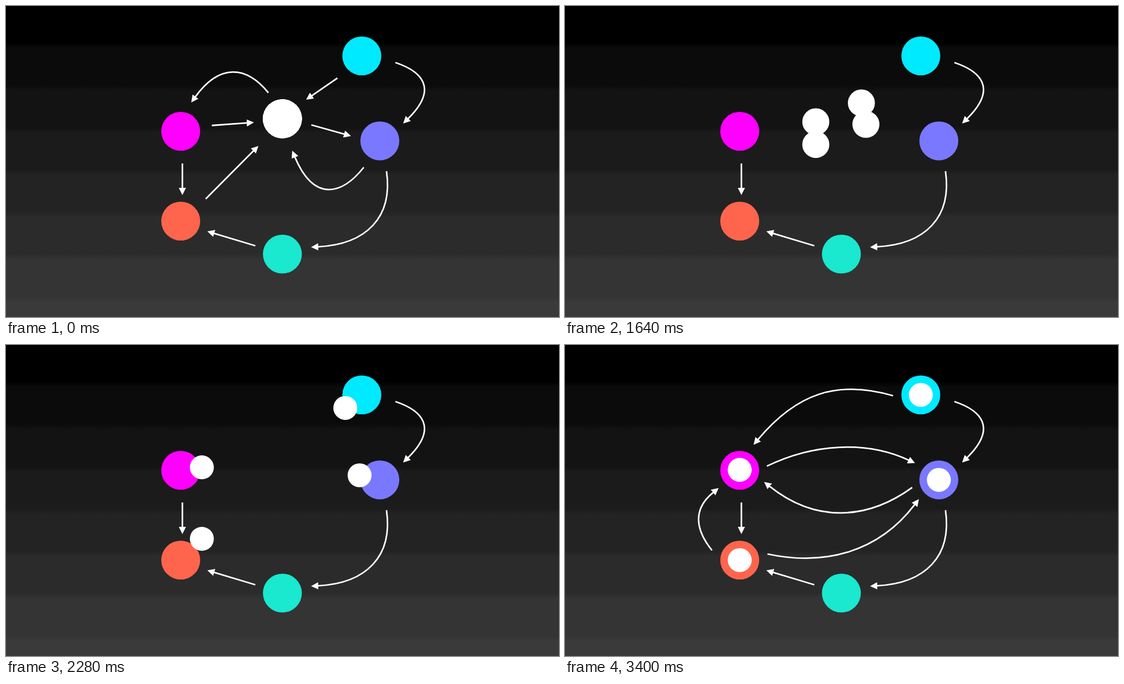
An HTML page that plays this animation: 997x561 px, repeating every 3880 ms.

```html
<!DOCTYPE html>
<html lang="en">
<head>
<meta charset="utf-8">
<title>Node graph</title>
<style>
  html, body { margin: 0; width: 100%; height: 100%; overflow: hidden; background: #000; }
  svg {
    display: block; width: 997px; height: 561px;
    background: linear-gradient(
      #000 66px, #0b0b0b 76px 143px, #131313 153px 219px, #1b1b1b 229px 295px,
      #232323 305px 371px, #2b2b2b 381px 447px, #343434 457px 524px, #3a3a3a 534px);
  }
  .arrows path { fill: none; stroke: #fff; stroke-width: 2.8; marker-end: url(#head); }
</style>
</head>
<body>
<svg viewBox="0 0 997 561">
  <defs>
    <marker id="head" markerUnits="userSpaceOnUse" markerWidth="13" markerHeight="13"
            refX="0.5" refY="6.5" orient="auto">
      <path d="M0 0L13 6.5L0 13Z" fill="#fff"/>
    </marker>
  </defs>
  <g id="fixed" class="arrows"></g>
  <g id="before" class="arrows"></g>
  <g id="after" class="arrows"></g>
  <g id="nodes"></g>
  <g id="parts"></g>
</svg>
<script>
const LOOP = 3880, STEP = 40;
const START = 980, MOVE = 1900, SHRINK = 960;
const HUB = { x: 498.3, y: 203.4, r: 35.2 }, PART_R = 21.6;

const $ = id => document.getElementById(id);

function add(parent, tag, attrs) {
  const el = document.createElementNS('http://www.w3.org/2000/svg', tag);
  for (const key in attrs) el.setAttribute(key, attrs[key]);
  return parent.appendChild(el);
}

// Points: tail, optional two curve controls, tip. The line stops at the base of the head.
function arrow(group, ...p) {
  const [cx, cy, tx, ty] = p.slice(-4);
  const k = 12.5 / Math.hypot(tx - cx, ty - cy);
  const end = [tx - (tx - cx) * k, ty - (ty - cy) * k];
  const mid = p.slice(2, -2);
  const d = `M${p[0]} ${p[1]}${mid.length ? 'C' : 'L'}${[...mid, ...end].join(' ')}`;
  add($(group), 'path', { d });
}

arrow('fixed', 702, 102, 750, 118, 780, 149, 716, 212);
arrow('fixed', 686, 298, 698, 381, 650, 430, 550, 435);
arrow('fixed', 318, 284, 318, 341);
arrow('fixed', 449.5, 432.5, 363, 406.5);

arrow('before', 473, 156.5, 432, 106, 384, 105, 334, 174);
arrow('before', 371, 215.5, 447, 210);
arrow('before', 360, 348, 455, 252.5);
arrow('before', 597.5, 130, 541, 169);
arrow('before', 550.5, 214.5, 622, 234.5);
arrow('before', 645, 291, 607, 339, 556, 356, 516, 261);

arrow('after', 591.5, 91.5, 490, 62, 417, 88, 340, 180);
arrow('after', 364, 218.5, 447, 178, 543, 172, 631, 213);
arrow('after', 626, 257, 546, 315, 453, 322, 359, 247);
arrow('after', 265, 370.5, 231, 328, 234, 293, 277, 258);
arrow('after', 365, 377, 468, 399, 565, 374, 638, 278);

const node = (cx, cy, fill) => add($('nodes'), 'circle', { cx, cy, r: 35.1, fill });
node(498.3, 447.5, '#1ae8cf');
const targets = [
  [315, 226, '#f0f'],
  [315, 388, '#ff654d'],
  [641.5, 90, '#00eaff'],
  [674, 243.3, '#7a78ff']
];
const parts = targets.map(([x, y, fill]) => {
  node(x, y, fill);
  return { x, y: y - (fill === '#f0f' ? 0.8 : 0), el: add($('parts'), 'circle', { fill: '#fff' }) };
});

// cubic-bezier(.42, 0, .58, 1)
function easeInOut(u) {
  if (u <= 0) return 0;
  if (u >= 1) return 1;
  let lo = 0, hi = 1, s;
  for (let i = 0; i < 20; i++) {
    s = (lo + hi) / 2;
    const x = 1.26 * s * (1 - s) ** 2 + 1.74 * s * s * (1 - s) + s ** 3;
    if (x < u) lo = s; else hi = s;
  }
  return s * s * (3 - 2 * s);
}

const mix = (a, b, k) => a + (b - a) * k;

function draw() {
  const t = Math.floor(performance.now() % LOOP / STEP) * STEP;
  const move = easeInOut((t - START) / MOVE);
  const r = mix(HUB.r, PART_R, easeInOut((t - START) / SHRINK));
  for (const { x, y, el } of parts) {
    el.setAttribute('cx', mix(HUB.x, x, move));
    el.setAttribute('cy', mix(HUB.y, y, move));
    el.setAttribute('r', r);
  }
  $('before').style.display = t < 520 ? '' : 'none';
  $('after').style.display = t >= 3400 ? '' : 'none';
  requestAnimationFrame(draw);
}
draw();
</script>
</body>
</html>
```
